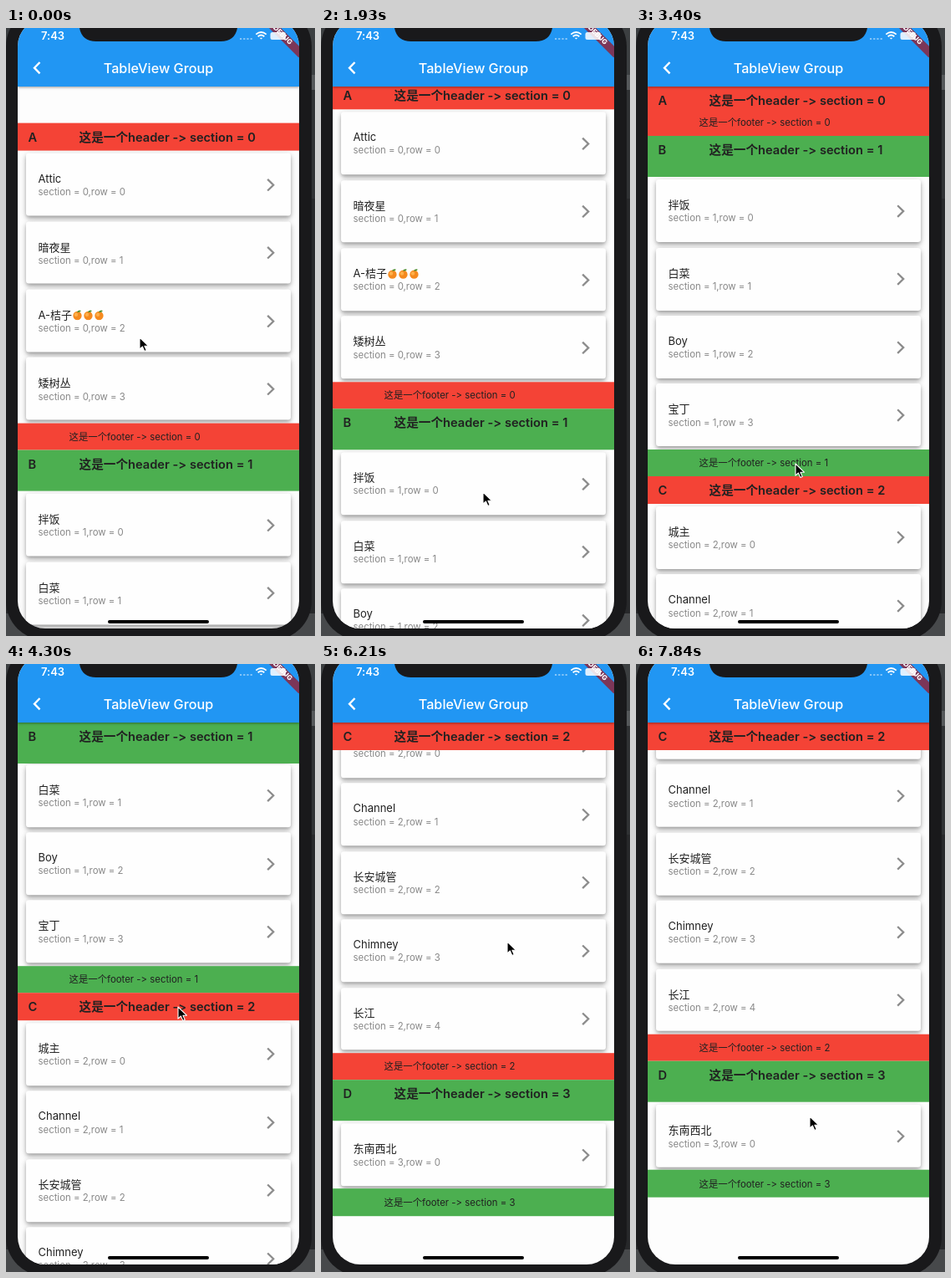
An HTML page that plays this animation: 370x727 px, repeating every 7.99 s.

```html
<!DOCTYPE html>
<html lang="zh-CN">
<head>
<meta charset="utf-8">
<title>TableView Group</title>
<style>
  html, body { margin: 0; width: 100%; height: 100%; overflow: hidden; background: #2b2c2e; }
  body {
    position: relative;
    font-family: Inter, "Noto Sans CJK SC", "Noto Sans CJK", sans-serif;
    font-variant-ligatures: none;
    font-feature-settings: "calt" 0;
    color: #212121;
  }
  div, span, svg { position: absolute; box-sizing: border-box; white-space: nowrap; }
  .desk { inset: 0; background: linear-gradient(#3c3f41 56px, #55585a 56px 74px, #303234 74px 204px, #27282a 204px 700px, #47494b 700px); }
  .phone { left: 0; top: -25px; width: 366px; height: 757px; border-radius: 47px; background: #19191b; }
  .screen { left: 14px; top: -11px; width: 337px; height: 729.4px; border-radius: 33px; background: #fdfdfd; overflow: hidden; }
  .bar { left: 0; top: 0; width: 337px; height: 81.4px; background: #2196f3; box-shadow: 0 1px 3px rgba(0,0,0,.4); }
  .title { left: 0; width: 337px; top: 49px; line-height: 20px; text-align: center; font-size: 16.2px; font-weight: 500; color: #fff; }
  .clock { left: 28px; top: 12px; line-height: 16px; font-size: 13px; font-weight: 600; color: #fff; }
  .view { left: 0; top: 81.4px; width: 337px; height: 648px; overflow: hidden; }
  .list { left: 0; top: 0; width: 337px; }
  .band { left: 0; width: 337px; }
  .band span { line-height: 20px; top: 6.5px; }
  .head { font-size: 14.65px; font-weight: 600; }
  .head .mark { left: 12.5px; }
  .head .text { left: 73.5px; }
  .foot .text { left: 61.5px; font-size: 11.4px; }
  .card {
    left: 9.7px; width: 317.6px; height: 74.9px; border-radius: 3.3px; background: #fefefe;
    box-shadow: 0 2.4px 4px -.8px rgba(0,0,0,.28), 0 4px 7px rgba(0,0,0,.13), 0 1px 9px rgba(0,0,0,.11);
  }
  .name { left: 14.8px; top: 20px; line-height: 20px; font-size: 13px; }
  .note { left: 14.8px; top: 36.2px; line-height: 20px; font-size: 11.4px; color: #888; }
  .name svg { position: static; width: 12.9px; height: 13px; vertical-align: -2px; }
  .card > svg { left: 287px; top: 29.5px; }
  .banner {
    left: 304.4px; top: 22.8px; width: 65.2px; height: 9.8px; transform-origin: 32.6px -22.8px;
    transform: rotate(45deg); background: rgba(150,28,45,.78); color: #fff;
    font-size: 8.2px; font-weight: 800; line-height: 9.8px; text-align: center;
  }
  .home { left: 122px; top: 708px; width: 121px; height: 4px; border-radius: 2px; background: #000; }
</style>
</head>
<body>
<div class="desk"></div>
<div class="phone"></div>
<div class="screen">
  <div class="view">
    <div class="list" id="list"></div>
    <div id="pin"></div>
  </div>
  <div class="bar"></div>
  <span class="title">TableView Group</span>
  <span class="clock">7:43</span>
  <div class="banner">DEBUG</div>
</div>
<svg width="370" height="80" style="left:0;top:0" fill="none">
  <path d="M88 0 Q91 16 108 16 H257 Q274 16 277 0Z" fill="#19191b"/>
  <path d="M40.5 41 L34 47.7 L40.5 54.4" stroke="#fff" stroke-width="2.4"/>
  <path d="M280 13h15" stroke="#fff" stroke-opacity=".45" stroke-width="2" stroke-dasharray="2.2 2"/>
  <g stroke="#fff" stroke-width="1.9">
    <path d="M299.3 7.6 Q305.5 2.2 311.7 7.6M301.7 10.2 Q305.5 6.9 309.3 10.2"/>
    <path d="M303.6 11.8 L305.5 13.6 L307.4 11.8Z" fill="#fff" stroke="none"/>
  </g>
  <rect x="316.5" y="5" width="18.5" height="9" rx="2.5" fill="#fff" fill-opacity=".85"/>
</svg>
<div class="home"></div>
<svg id="mouse" width="16" height="22" style="left:-1px;top:-1px">
  <path d="M1 1 V15.2 L4.4 12 L6.8 17.4 L9.2 16.4 L6.9 11.2 H11.4Z" fill="#000" stroke="#fff" stroke-width="1.1" stroke-linejoin="round"/>
</svg>

<script>
const DP = 337 / 414, ROW = 100 * DP, SLIM = 40 * DP, TALL = 60 * DP;
const RED = '#f44336', GREEN = '#4caf50';
const STEP = 148, LOOP = 7990, LAST = 53;

const orange = `<svg viewBox="0 0 13 13"><circle cx="6.5" cy="7.4" r="5.2" fill="#f58a1f"/>
  <circle cx="5" cy="6.2" r="2.2" fill="#ffb04a"/><path d="M6 3 Q8 0 11 1.4 Q9.5 4 6 3Z" fill="#4f8f2f"/></svg>`;
const chevron = `<svg width="14" height="17" fill="none"><path d="M2.2 1.3 L9.2 8.1 L2.2 14.9" stroke="#8c8c8c" stroke-width="2.3"/></svg>`;

const groups = [
  ['Attic', '暗夜星', 'A-桔子' + orange.repeat(3), '矮树丛'],
  ['拌饭', '白菜', 'Boy', '宝丁'],
  ['城主', 'Channel', '长安城管', 'Chimney', '长江'],
  ['东南西北']
];

const band = (kind, i, y, h) => `<div class="band ${kind}" style="top:${y}px;height:${h}px;background:${i % 2 ? GREEN : RED}">
  ${kind === 'head' ? `<span class="mark">${'ABCD'[i]}</span>` : ''}
  <span class="text">这是一个${kind}er -&gt; section = ${i}</span></div>`;

const card = (name, i, row, y) => `<div class="card" style="top:${y + 4 * DP}px">
  <span class="name">${name}</span><span class="note">section = ${i},row = ${row}</span>${chevron}</div>`;

let y = 0, html = '';
const heads = groups.map((rows, i) => {
  const top = y, h = i % 2 ? TALL : SLIM;
  y += h;
  rows.forEach((name, row) => { html += card(name, i, row, y); y += ROW; });
  // bands follow the cards so that they cover the card shadows
  html += band('head', i, top, h) + band('foot', i, y, SLIM);
  y += SLIM;
  return { top, h };
});
const list = document.getElementById('list');
const pin = document.getElementById('pin');
const mouse = document.getElementById('mouse');
list.innerHTML = html;

// [step, scroll offset]
const scroll = [
  [0, -43.6], [3, -64], [5, -56], [6, -28], [7, -8], [8, -2], [9, -.6], [10, 0], [12, 0],
  [13, 5.7], [14, 50], [16, 140], [18, 215], [20, 265], [22, 307], [23, 332],
  [26, 425], [29, 474.8], [31, 555], [35, 733.8], [38, 795], [42, 842.8],
  [43, 830], [45, 817], [47, 838], [49, 880], [50, 883], [51, 874], [52, 868], [53, 865.3]
];
// [step, x, y]
const pointer = [
  [0, 160, 370], [5, 172, 425], [10, 194, 561], [12, 194, 561], [13, 194, 555], [16, 204, 430],
  [20, 195, 558], [23, 191, 521], [26, 203, 430], [29, 206, 410], [32, 200, 555], [35, 198, 473],
  [38, 212, 370], [42, 223, 332], [45, 220, 358], [49, 212, 470], [53, 208, 541]
];

function at(track, k, col = 1) {
  const i = Math.max(1, track.findIndex(p => p[0] >= k));
  const a = track[i - 1], b = track[i];
  return a[col] + (b[col] - a[col]) * (k - a[0]) / (b[0] - a[0]);
}

let pinned = -1;
function draw(now) {
  const k = Math.min(LAST, Math.floor((now % LOOP + 9) / STEP));
  const s = at(scroll, k);
  list.style.transform = `translateY(${-s}px)`;
  const cur = s < 7 ? -1 : heads.filter(h => h.top <= s).length - 1;
  if (cur !== pinned) {
    pin.innerHTML = cur < 0 ? '' : band('head', cur, 0, heads[cur].h);
    pinned = cur;
  }
  const next = heads[cur + 1];
  const push = cur >= 0 && next ? Math.min(0, next.top - s - heads[cur].h) : 0;
  pin.style.transform = `translateY(${push}px)`;
  mouse.style.transform = `translate(${at(pointer, k, 1)}px,${at(pointer, k, 2)}px)`;
}

const start = performance.now();
function tick() {
  draw(performance.now() - start);
  requestAnimationFrame(tick);
}
tick();
</script>
</body>
</html>
```
